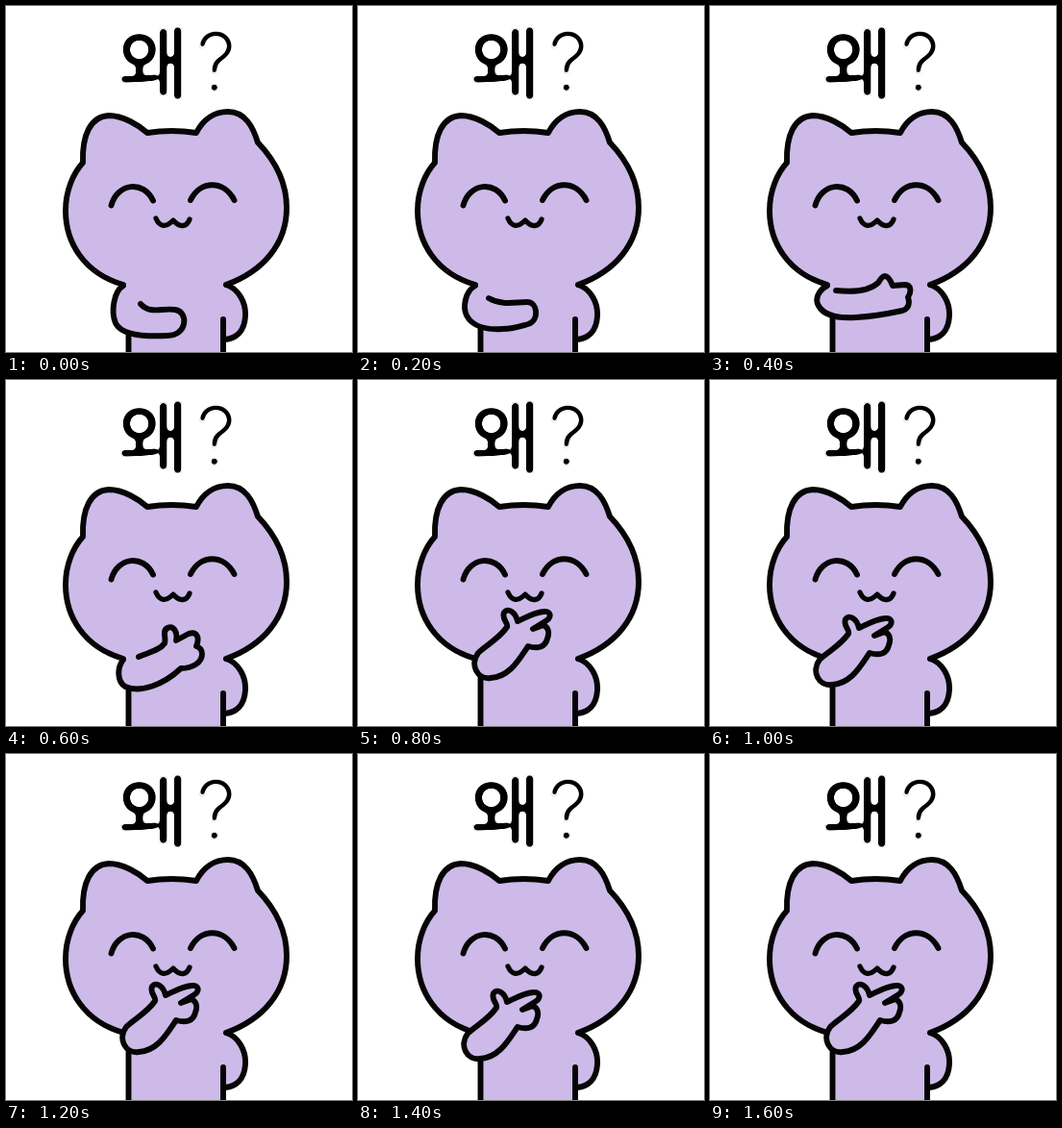
Write an HTML page without scripts that moves like this. It is 360 px wide and 360 px high and loops after 1800 ms.

```html
<!DOCTYPE html>
<html lang="ko">
<head>
<meta charset="utf-8">
<title>왜?</title>
<style>
  html, body { margin: 0; width: 100%; height: 100%; overflow: hidden; background: #fff; }
  svg { display: block; width: 100%; height: 100%; }

  .cat { fill: #cdbae8; stroke: #050505; stroke-width: 5.9; stroke-linecap: round; stroke-linejoin: round; }
  .line { fill: none; }
  .body { stroke: none; }

  .word { stroke-linejoin: round; }
  .syllable { --pen: 1.8px; font: 80px "Noto Sans CJK KR", "Noto Sans CJK", "Noto Sans CJK JP", sans-serif; }
  .mark { --pen: 5px; font: 200 82px Inter, sans-serif; text-anchor: middle; }
  .word text { stroke-width: calc(var(--pen) + var(--grow)); }
  .rim { --grow: 6px; fill: #888; stroke: #888; }
  .halo { --grow: 4.6px; fill: #fff; stroke: #fff; }
  .ink { --grow: 0px; fill: #050505; stroke: #050505; filter: url(#soften); }

  /* Nine steps of 200 ms: four raising poses, then a chin rub. */
  .pose {
    visibility: hidden;
    animation: show 1800ms step-end calc((var(--step) - 9) * 200ms) infinite;
  }
  .rub { animation: rub 1800ms step-end infinite; }

  @keyframes show {
    0% { visibility: visible; }
    11.1111%, 100% { visibility: hidden; }
  }
  @keyframes rub {
    0% { visibility: hidden; transform: none; }
    44.4444%, 66.6667%, 88.8889% { visibility: visible; transform: translate(11px, -7px); }
    55.5556%, 77.7778% { visibility: visible; transform: none; }
    100% { visibility: hidden; transform: none; }
  }
</style>
</head>
<body>
<svg viewBox="0 0 360 360">
  <defs>
    <!-- Blur and threshold: rounds the stroke ends. -->
    <filter id="soften">
      <feGaussianBlur stdDeviation="2"/>
      <feComponentTransfer><feFuncA type="linear" slope="8" intercept="-3.5"/></feComponentTransfer>
    </filter>
    <g id="word">
      <text class="syllable" x="117" y="88.5">왜</text>
      <text class="mark" x="218.5" y="88">?</text>
    </g>
  </defs>

  <g class="word">
    <use href="#word" class="rim"/>
    <use href="#word" class="halo"/>
    <use href="#word" class="ink"/>
  </g>

  <g class="cat">
    <path class="body" d="M127 364V300L121 288L140 278H229V290C242 294 250 309 249 323C248 339 239 346 228 347L226 364Z"/>
    <path class="line" d="M229 290C242 294 250 309 249 323C248 339 239 346 228 347M226 326V364M127.5 309V364"/>

    <path d="M122 290C81 278 62 246 62 213C62 192 70 174 80 163C79 134 88 115 107 114C122 114 138 124 147 132Q172 128 198 132C205 118 217 110 231 110C249 110 257 126 262 142C283 164 292 186 292 210C292 247 268 276 229 290"/>

    <g class="line">
      <path d="M109.500 207.500C116 184 143 181 153 202.500M192 202C202 181 227 181 237.500 202"/>
      <path d="M156 221C160 230 166 231 174 223C181 231 188 230 191 222" stroke-width="5.3"/>
    </g>

    <path class="pose" style="--step:0" d="M122 291C112 297 109 318 114 330C121 344 148 344 168 343C189 343 190 318 176 316C162 314 150 321 140 310"/>
    <path class="pose" style="--step:1" d="M122 291C111 297 109 314 113 322C119 334 135 337 150 336C162 336 170 333 177 331C189 327 187 308 176 308C163 308 150 312 136 304"/>
    <path class="pose" style="--step:2" d="M122 291C112 296 109 306 113 312C119 323 137 325 152 324C171 323 186 320 200 317C207 315 208 309 206 303C210 297 209 290 203 290L190 291C188 286 185 281 182 281C179 281 177 285 175 288C165 297 149 298 131 296"/>
    <path class="pose" style="--step:3" d="M122 291C115 300 116 314 124 319C140 326 164 317 182 300C194 300 204 294 204 285C204 280 201 278 198 277C202 267 198 261 190 264L177 271C179 262 174 255 168 258C162 261 167 268 165 274C160 281 150 283 138 288"/>
    <path class="rub" d="M127 317C113 319 105 303 114 291C122 283 136 276 144 264C146 260 138 256 141 249C145 243 153 249 155 258C164 254 172 249 182 248C190 247 191 254 184 258L171 266L182 262C188 265 188 271 186 276C184 285 176 287 166 284C157 297 147 316 127 317Z"/>
  </g>
</svg>
</body>
</html>
```
